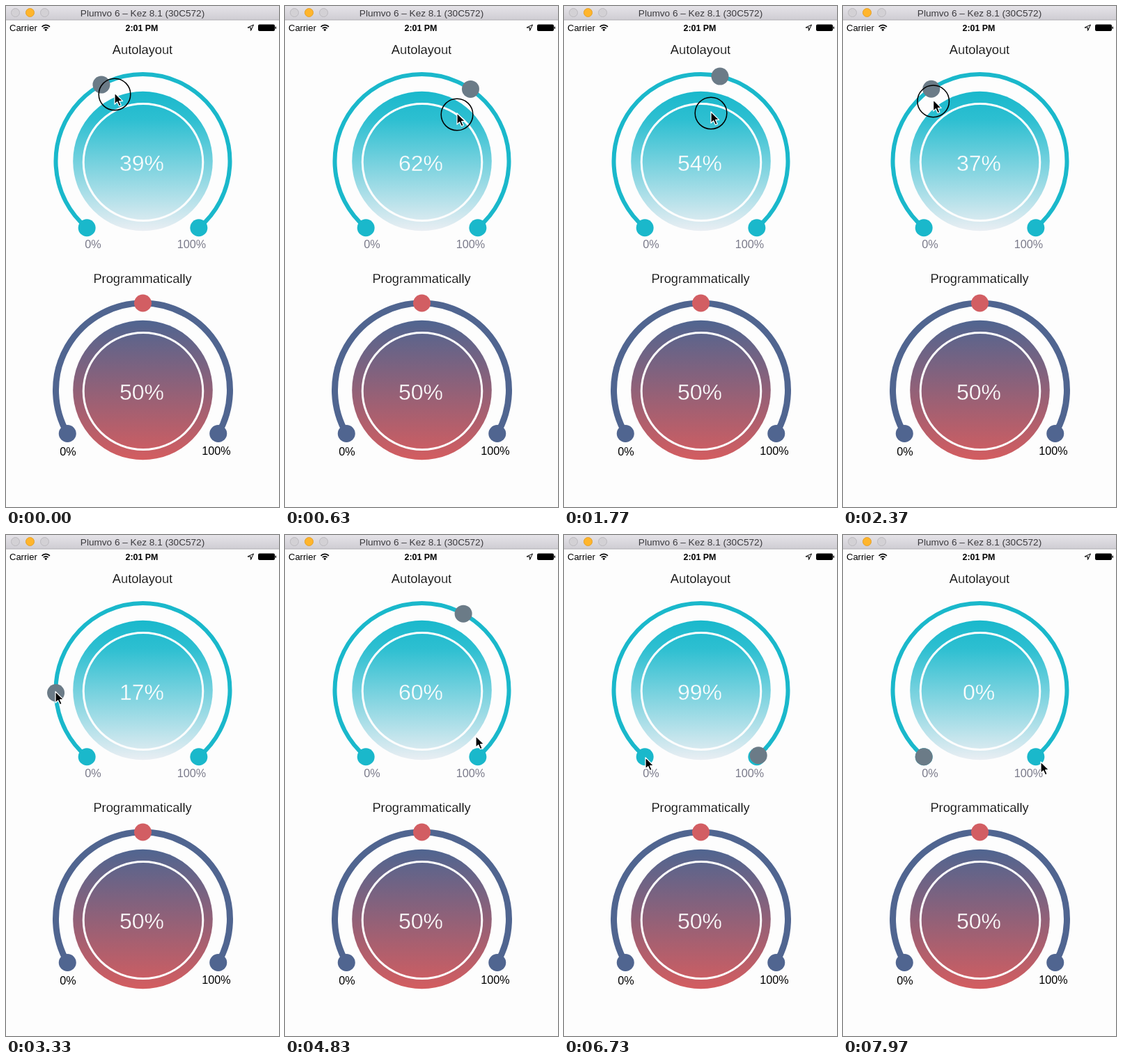
These frames come from a looping animation (392x720 px, 8000 ms). An HTML page:

```html
<!DOCTYPE html>
<html lang="en">
<head>
<meta charset="utf-8">
<title>Circular sliders</title>
<style>
  html, body { margin: 0; width: 100%; height: 100%; overflow: hidden; background: #fdfdfd; }
  svg { display: block; width: 392px; height: 720px; }
  text { font-family: "Liberation Sans", Arial, sans-serif; }
  .mid { text-anchor: middle; }
  .heading { font-size: 18.3px; fill: #000; stroke: #fdfdfd; stroke-width: .25px; }
  .value { font-size: 32px; fill: #fdfdfd; stroke-width: .35px; }
  .limit { font-size: 16.2px; }
  .ring { fill: none; stroke: #fdfdfd; stroke-width: 3; }
</style>
</head>
<body>
<svg viewBox="0 0 392 720">
  <defs>
    <linearGradient id="bar" x2="0" y2="1">
      <stop stop-color="#e5e3e8"/><stop offset="1" stop-color="#cfcdd3"/>
    </linearGradient>
    <linearGradient id="aqua" gradientUnits="userSpaceOnUse" x1="0" x2="0" y1="123" y2="323">
      <stop stop-color="#1ab8cc"/><stop offset=".2" stop-color="#2dbfd1"/>
      <stop offset="1" stop-color="#e9eef3"/>
    </linearGradient>
    <linearGradient id="dusk" gradientUnits="userSpaceOnUse" x1="0" x2="0" y1="452" y2="652">
      <stop stop-color="#506590"/><stop offset="1" stop-color="#d35d60"/>
    </linearGradient>
  </defs>

  <rect width="392" height="720" fill="#fdfdfd"/>
  <rect width="392" height="20" fill="url(#bar)"/>
  <rect y="19.5" width="392" height="1" fill="#b0aeb4"/>
  <g stroke-width="1">
    <circle cx="13.5" cy="9.5" r="6" fill="#d3d1d5" stroke="#bcbabf"/>
    <circle cx="34.5" cy="9.5" r="6" fill="#ffb52c" stroke="#e5a028"/>
    <circle cx="55.5" cy="9.5" r="6" fill="#d3d1d5" stroke="#bcbabf"/>
  </g>
  <text class="mid" x="196" y="14.5" font-size="13.6" fill="#3c3b3f">Plumvo 6 – Kez 8.1 (30C572)</text>

  <text x="5" y="36" font-size="13">Carrier</text>
  <g fill="none" stroke="#000" stroke-width="1.7">
    <path d="M51.5 29.8a8 8 0 0 1 11.4 0M53.8 32.2a4.8 4.8 0 0 1 6.8 0"/>
    <path d="M57.2 36.2l-2-2.2a3 3 0 0 1 4 0z" fill="#000" stroke="none"/>
  </g>
  <text class="mid" x="195" y="36" font-size="12.4" font-weight="bold">2:01 PM</text>
  <path d="M355.5 27l-4 8.5v-4.5h-4.5z" fill="none" stroke="#000"/>
  <rect x="362" y="26.5" width="24" height="9.5" rx="2"/>
  <rect x="386.6" y="29.5" width="1.4" height="3.5" rx=".7"/>

  <text class="heading mid" x="196" y="69">Autolayout</text>
  <g id="upper"></g>
  <g fill="#7a7a8a">
    <text class="limit mid" x="125" y="348">0%</text>
    <text class="limit mid" x="266.5" y="347.5">100%</text>
  </g>

  <text class="heading mid" x="196" y="398">Programmatically</text>
  <g id="lower"></g>
  <text class="limit mid" x="89" y="645.5">0%</text>
  <text class="limit mid" x="302" y="645">100%</text>

  <g id="cursor">
    <circle id="press" r="22.8" fill="none" stroke="#000" stroke-width="1.5"/>
    <path d="M0-2V14.2L3.7 10.8 6.4 16.8 9.2 15.6 6.6 9.7H11.6Z"
      stroke="#fff" stroke-width="1.2" stroke-linejoin="round"/>
  </g>
</svg>
<script>
const LOOP = 8000, CX = 196.5, CY = 223, RADIUS = 125, SWEEP = 140;
const LAG = 35, DRAG_END = 3300, PRESS = 120, GLIDE = 120;
const $ = id => document.getElementById(id);

// Angles are in degrees, clockwise from the top.
function onArc(cy, deg) {
  const a = deg * Math.PI / 180;
  return [CX + RADIUS * Math.sin(a), cy - RADIUS * Math.cos(a)];
}

function buildDial(id, { cy, limit, width, color, fill, knob, label }) {
  const [x0, y0] = onArc(cy, -limit), [x1, y1] = onArc(cy, limit), [kx, ky] = onArc(cy, 0);
  $(id).innerHTML = `
    <path d="M${x0} ${y0}A${RADIUS} ${RADIUS} 0 1 1 ${x1} ${y1}" fill="none" stroke="${color}" stroke-width="${width}"/>
    <circle cx="${x0}" cy="${y0}" r="12.5" fill="${color}"/>
    <circle cx="${x1}" cy="${y1}" r="12.5" fill="${color}"/>
    <circle cx="${CX}" cy="${cy}" r="100.3" fill="url(#${fill})"/>
    <ellipse class="ring" cx="197" cy="${cy + 1.5}" rx="85.8" ry="84"/>
    <text class="value mid" x="195" y="${cy + 13.7}" stroke="url(#${fill})">${label}</text>
    <circle class="knob" cx="${kx}" cy="${ky}" r="12.5" fill="${knob}"/>`;
}
buildDial('upper', { cy: CY, limit: SWEEP, width: 6, color: '#1ab8cb', fill: 'aqua', knob: '#6b7b87', label: '39%' });
buildDial('lower', { cy: 552, limit: 120, width: 9, color: '#506590', fill: 'dusk', knob: '#d25e63', label: '50%' });

// Pointer path: time, x, y
const path = [
  [-70, 134, 130], [-35, 145, 128], [0, 156, 127], [630, 247, 156], [1000, 278, 196],
  [1480, 216, 157], [1770, 211, 154], [2150, 160, 112], [2500, 112, 160], [2850, 67, 226],
  [3330, 71, 227], [3600, 272, 270], [3720, 274, 280], [4100, 75, 262], [4240, 79, 268],
  [4640, 273, 289], [4830, 274, 291], [5260, 114, 316], [5440, 115, 318],
  [5920, 279, 321], [6110, 279, 322], [6560, 117, 321], [6800, 117, 322],
  [7480, 88, 300], [7720, 170, 194], [7900, 284, 322], [7970, 284, 328], [8040, 284, 328]
];
const taps = [3690, 4210, 4764, 5400, 6070, 6725];

function slope(i, k) {
  const a = path[Math.max(i - 1, 0)], b = path[i], c = path[Math.min(i + 1, path.length - 1)];
  if (a === b || b === c || (b[k] - a[k]) * (c[k] - b[k]) <= 0) return 0;
  const s = (b[k] - a[k]) / (b[0] - a[0]), r = (c[k] - b[k]) / (c[0] - b[0]);
  return 2 * s * r / (s + r);
}

function pointer(t) {
  const i = Math.max(path.findIndex(p => p[0] > t) - 1, 0);
  const p = path[i], q = path[i + 1], h = q[0] - p[0], u = (t - p[0]) / h;
  const along = k => p[k] + (q[k] - p[k]) * u * u * (3 - 2 * u)
    + h * u * (1 - u) * ((1 - u) * slope(i, k) - u * slope(i + 1, k));
  return [along(1), along(2)];
}

function pointerAngle(t) {
  const [x, y] = pointer(t);
  const deg = Math.atan2(x - CX, CY - y) * 180 / Math.PI;
  return Math.max(-SWEEP, Math.min(SWEEP, deg));
}

function knobAngle(t) {
  if (t < DRAG_END) return pointerAngle(t - LAG);
  let deg = pointerAngle(DRAG_END);
  for (const tap of taps) {
    if (t < tap) break;
    const u = Math.min((t - tap) / GLIDE, 1);
    deg += (pointerAngle(tap) - deg) * u * u * (3 - 2 * u);
  }
  return deg;
}

const knob = document.querySelector('#upper .knob'), value = document.querySelector('#upper .value');
let start;

function draw(now) {
  start ??= now;
  const t = (now - start) % LOOP, deg = knobAngle(t);
  const [kx, ky] = onArc(CY, deg), [x, y] = pointer(t);
  knob.setAttribute('cx', kx);
  knob.setAttribute('cy', ky);
  value.textContent = Math.floor((deg + SWEEP) / (2 * SWEEP) * 100) + '%';
  $('cursor').setAttribute('transform', `translate(${x} ${y})`);
  const down = t < DRAG_END || taps.some(tap => t >= tap - PRESS && t < tap);
  $('press').style.display = down ? '' : 'none';
  requestAnimationFrame(draw);
}
requestAnimationFrame(draw);
</script>
</body>
</html>
```
